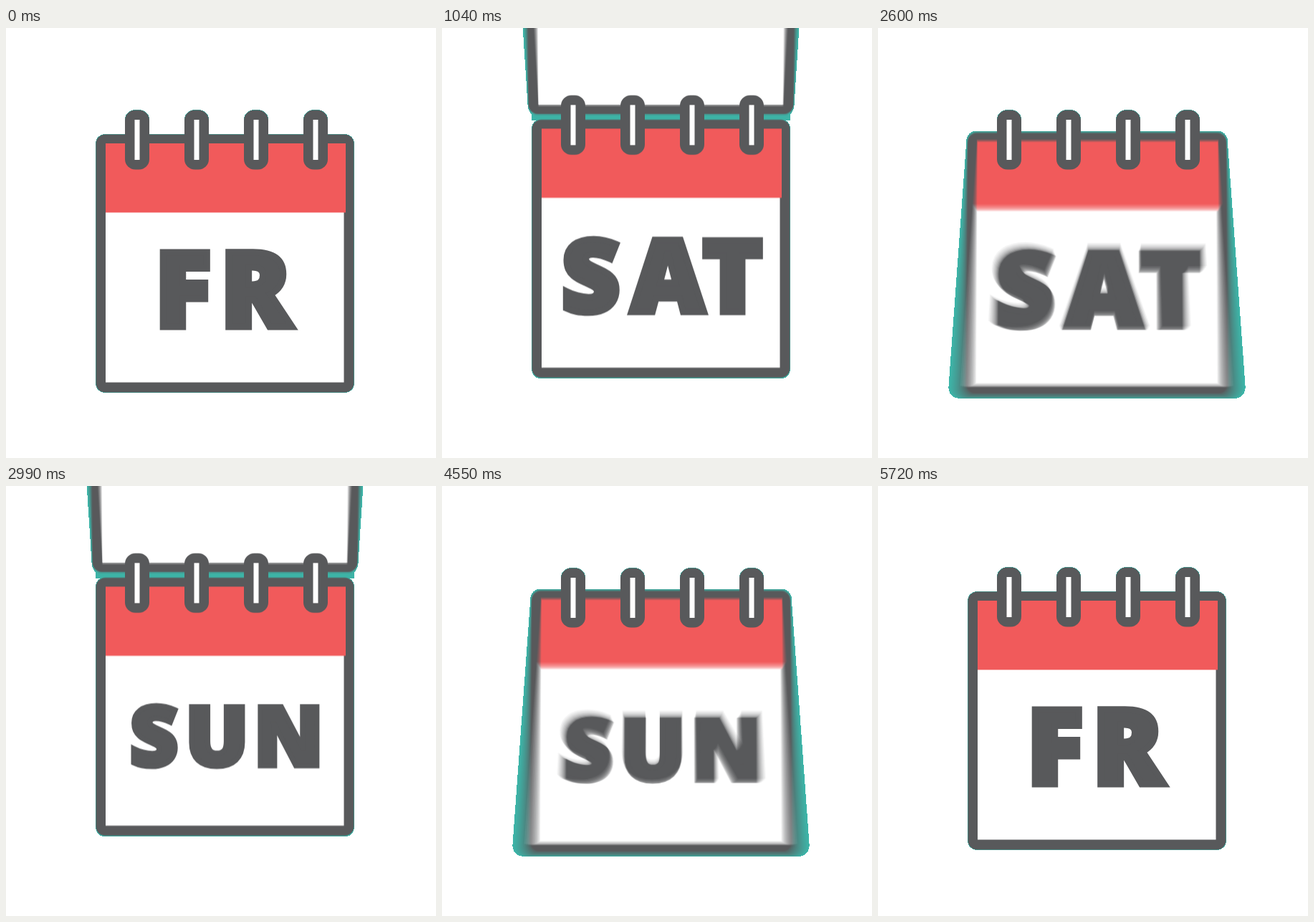
Write an HTML page with a canvas that moves like this. It is 600 px wide and 600 px high and loops after 5850 ms.

```html
<!DOCTYPE html>
<html lang="en">
<head>
<meta charset="utf-8">
<title>Weekend calendar</title>
<style>
  html, body { margin: 0; width: 100%; height: 100%; overflow: hidden; background: #fff; }
  canvas { display: block; width: 600px; height: 600px; }
</style>
</head>
<body>
<canvas id="stage" width="600" height="600"></canvas>
<script>
const SIZE = 600, STEP = 130, CYCLE = 1950, LOOP = 3 * CYCLE;
const GRAY = '#58595b', RED = '#f15a5b', TEAL = [60, 184, 171];
const LEFT = 125.5, TOP = 148.5, SIDE = 360;
const EYE_X = 305.5, EYE_Y = 295, EYE_DIST = 850, LIFT = 22, RISE = 8;
const FLIP_START = 585, FLIP_END = 1105, SLIDE_END = 1620;
const SAMPLES = 14;

// Vertical jolt of the calendar: [ms in cycle, px]
const JOLT = [[780, 0], [1040, -21], [1300, 0], [1430, 2.5], [1560, 1.5], [1690, -1], [1820, -1], [1950, 0]];

// Each letter is centred on its own x
const WORDS = [
  { cap: 112.5, base: 421, letters: [['F', 250], ['R', 355]] },
  { cap: 109, base: 421, letters: [['S', 208.5], ['A', 315], ['T', 405.5]] },
  { cap: 90, base: 414.5, letters: [['S', 207.5], ['U', 294.5], ['N', 394]] }
];

function makeContext() {
  const canvas = document.createElement('canvas');
  canvas.width = canvas.height = SIZE;
  return canvas.getContext('2d', { willReadFrequently: true });
}

function box(ctx, color, x, y, w, h, r = 0) {
  ctx.fillStyle = color;
  ctx.beginPath();
  ctx.roundRect(x, y, w, h, r);
  ctx.fill();
}

function drawWord(ctx, { cap, base, letters }) {
  const weight = cap * 0.08;
  ctx.font = `800 ${(cap - weight) / 0.714}px "Open Sans", sans-serif`;
  ctx.lineWidth = weight;
  ctx.lineJoin = 'miter';
  ctx.miterLimit = 4;
  ctx.fillStyle = ctx.strokeStyle = GRAY;
  for (const [letter, center] of letters) {
    const m = ctx.measureText(letter);
    const x = center + (m.actualBoundingBoxLeft - m.actualBoundingBoxRight) / 2;
    ctx.fillText(letter, x, base - weight / 2);
    ctx.strokeText(letter, x, base - weight / 2);
  }
}

function makePage(word) {
  const ctx = makeContext();
  box(ctx, GRAY, LEFT, TOP, SIDE, SIDE, 13);
  box(ctx, '#fff', 139, 161, 332.5, 333.5);
  if (word) {
    box(ctx, RED, 139, 161, 335, 96.5);
    drawWord(ctx, word);
  }
  return ctx.canvas;
}

const pages = WORDS.map(makePage);
const back = makePage();
const stage = document.getElementById('stage').getContext('2d');
const layer = makeContext();

const clamp = u => Math.min(1, Math.max(0, u));
const ease = u => { u = clamp(u); return u * u * (3 - 2 * u); };

function joltAt(p) {
  let y = 0;
  for (let i = 1; i < JOLT.length; i++) {
    const [t0, y0] = JOLT[i - 1], [t1, y1] = JOLT[i];
    if (p >= t0 && p < t1) y = y0 + (y1 - y0) * ease((p - t0) / (t1 - t0));
  }
  return y;
}

// Page turned by an angle about its top edge, drawn row by row in perspective
function drawTurned(ctx, front, hinge, angle, lift) {
  const sin = Math.sin(angle), cos = Math.cos(angle), dist = EYE_DIST - lift;
  const scaleAt = l => EYE_DIST / (dist - l * sin);
  const project = l => EYE_Y + (hinge + l * cos - EYE_Y) * scaleAt(l);
  const unproject = y => ((y - EYE_Y) * dist - EYE_DIST * (hinge - EYE_Y)) /
    (EYE_DIST * cos + (y - EYE_Y) * sin);
  const start = project(0), end = project(SIDE);
  const image = end > start ? front : back;
  const first = Math.max(0, Math.floor(Math.min(start, end)));
  const last = Math.min(SIZE, Math.ceil(Math.max(start, end)));
  for (let y = first; y < last; y++) {
    const mid = unproject(y + 0.5);
    if (mid < 0 || mid > SIDE) continue;
    const a = unproject(y), b = unproject(y + 1), s = scaleAt(mid);
    ctx.drawImage(image, 0, TOP + Math.min(a, b), SIZE, Math.abs(b - a),
      EYE_X * (1 - s), y, SIZE * s, 1);
  }
}

function drawRings(ctx, dy) {
  for (let i = 0; i < 4; i++) {
    const x = 183 + i * 83;
    box(ctx, GRAY, x - 17, 114.5 + dy, 34, 83, 14.5);
    box(ctx, '#fff', x - 3.5, 128 + dy, 7, 56);
  }
}

function drawScene(ctx, day, p) {
  const dy = joltAt(p);
  const current = pages[day], next = pages[(day + 1) % 3];
  const flip = ease((p - FLIP_START) / (FLIP_END - FLIP_START));
  const slide = ease((p - FLIP_END) / (SLIDE_END - FLIP_END));
  ctx.clearRect(0, 0, SIZE, SIZE);
  if (p > 950 && p < 1200) box(ctx, 'rgba(88,89,91,.05)', LEFT, TOP - 7 + dy, SIDE, 8);
  if (flip === 1 && slide < 1) {
    drawTurned(ctx, back, TOP + dy + SIDE * slide, Math.PI, LIFT * (1 - slide));
  }
  ctx.drawImage(flip > 0 ? next : current, 0, dy);
  if (flip > 0 && flip < 1) {
    const angle = Math.PI * flip;
    drawTurned(ctx, current, TOP + dy - RISE * Math.sqrt(Math.sin(angle)), angle, LIFT * flip);
  }
  drawRings(ctx, Math.min(dy, 0));
}

// Averages several moments for motion blur, over a teal matte
function render(time) {
  const day = Math.floor(time / CYCLE), p = time % CYCLE;
  const count = p >= 650 && p < 1690 ? SAMPLES : 1;
  const shutter = p < FLIP_END ? 78 : 20;
  const sums = new Float32Array(SIZE * SIZE * 4);
  for (let i = 0; i < count; i++) {
    drawScene(layer, day, p + ((i + 0.5) / count - 0.5) * shutter);
    const { data } = layer.getImageData(0, 0, SIZE, SIZE);
    for (let k = 0; k < data.length; k += 4) {
      const alpha = data[k + 3] / 255 / count;
      if (!alpha) continue;
      for (let c = 0; c < 3; c++) sums[k + c] += data[k + c] * alpha;
      sums[k + 3] += alpha;
    }
  }
  const picture = new ImageData(SIZE, SIZE);
  picture.data.fill(255);
  for (let k = 0; k < sums.length; k += 4) {
    const cover = sums[k + 3];
    if (cover < 0.01) continue;
    for (let c = 0; c < 3; c++) picture.data[k + c] = sums[k + c] + TEAL[c] * (1 - cover);
  }
  return picture;
}

const pictures = [];
let shown = -1;
function tick() {
  const step = Math.floor(performance.now() % LOOP / STEP);
  if (step !== shown) {
    shown = step;
    pictures[step] ??= render(step * STEP);
    stage.putImageData(pictures[step], 0, 0);
  }
  requestAnimationFrame(tick);
}
tick();
</script>
</body>
</html>
```
